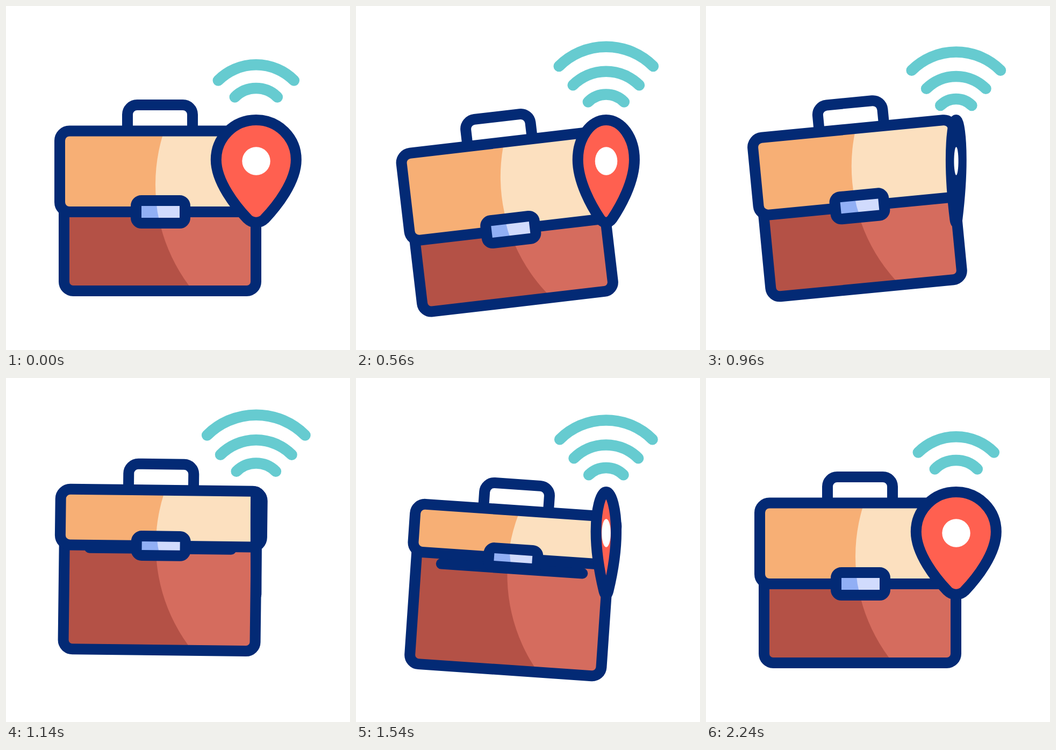
An HTML page that plays this animation: 640 px wide and 640 px high, repeating every 2400 ms.

```html
<!DOCTYPE html>
<html lang="en">
<head>
<meta charset="utf-8">
<title>Briefcase with location pin</title>
<style>
  html, body { margin: 0; width: 100%; height: 100%; overflow: hidden; background: #fff; }
  svg { display: block; width: 100vw; height: 100vh; }
  .line { fill: none; stroke: #032a75; stroke-width: 20; stroke-linecap: round; stroke-linejoin: round; }
  .wave { fill: none; stroke: #66cbd0; stroke-width: 20.5; stroke-linecap: round; }
</style>
</head>
<body>
<svg viewBox="0 0 640 640">
  <defs>
    <clipPath id="bodyClip"><rect x="108" y="262" width="357" height="268" rx="17"/></clipPath>
    <clipPath id="flapClip"><rect class="flap" x="100" y="232.5" width="375" rx="18"/></clipPath>
    <clipPath id="aboveTip"><rect width="640" height="207"/></clipPath>
  </defs>

  <g id="bag">
    <path class="line" d="M226 233V202a18 18 0 0 1 18-18H329a18 18 0 0 1 18 18V233"/>
    <g clip-path="url(#bodyClip)">
      <rect x="100" y="250" width="380" height="290" fill="#b45146"/>
      <circle cx="593" cy="332" r="315" fill="#d56c5e"/>
    </g>
    <rect class="line" x="108" y="262" width="357" height="268" rx="17"/>
    <path class="line" d="M155 341H418"/>
    <g clip-path="url(#flapClip)">
      <rect x="90" y="222" width="400" height="200" fill="#f7af75"/>
      <circle cx="593" cy="332" r="315" fill="#fce0bf"/>
    </g>
    <rect class="line flap" x="100" y="232.5" width="375" rx="18"/>
    <g id="lock">
      <rect class="lockBox" x="242" width="91" rx="10" fill="#d1dbfd"/>
      <path d="M245-12H280.3Q281.3 0 284.3 12H245Z" fill="#91aff5"/>
      <rect class="line lockBox" x="242" width="91" rx="10"/>
    </g>
  </g>

  <g clip-path="url(#aboveTip)">
    <path class="wave"/><path class="wave"/><path class="wave"/>
  </g>

  <path id="pin" class="line" style="fill:#ff6050"/>
  <ellipse id="hole" cx="465.5" cy="288.5" ry="26.2" fill="#fff"/>
</svg>
<script>
const LOOP = 2400, START = 200, WAVE_TIME = 505, PIN_X = 465.3;
const $ = s => document.querySelector(s), $$ = s => [...document.querySelectorAll(s)];
const bag = $('#bag'), lock = $('#lock'), pin = $('#pin'), hole = $('#hole');
const flaps = $$('.flap'), lockBoxes = $$('.lockBox'), waves = $$('.wave');

// [time, value] keys
const tilt = [[205, 0], [745, -9], [1440, 6.9], [1735, -4.5], [2240, 0]];
const lift = [[200, 0], [700, 25], [1160, -24], [1710, 23.8], [2240, 0]];
const stretch = [[205, 0], [745, 17], [1440, -87.7], [1735, 13.3], [2240, 0]];
const turn = [[200, 1], [1190, 0], [2240, 1]];

// start and end [radius, centre y] of each ring
const rings = [[[99.7, 209], [133.6, 195.8]], [[55.9, 209], [99.7, 209]], [[26, 219.3], [55.9, 209]]];

const mix = (a, b, p) => a + (b - a) * p;

function at(keys, t) {
  if (t <= keys[0][0]) return keys[0][1];
  for (let i = 1; i < keys.length; i++) {
    const [t0, a] = keys[i - 1], [t1, b] = keys[i];
    if (t < t1) return mix(a, b, (1 - Math.cos(Math.PI * (t - t0) / (t1 - t0))) / 2);
  }
  return keys[keys.length - 1][1];
}

function pinPath(w) {
  const pt = (x, y) => `${(PIN_X + x * w).toFixed(2)} ${y}`;
  return `M${pt(0, 212)}C${pt(41, 212)} ${pt(74.5, 245)} ${pt(74.5, 286)}` +
    `C${pt(74.5, 327)} ${pt(38, 373)} ${pt(16, 396)}C${pt(7, 405)} ${pt(-7, 405)} ${pt(-16, 396)}` +
    `C${pt(-38, 373)} ${pt(-74.5, 327)} ${pt(-74.5, 286)}C${pt(-74.5, 245)} ${pt(-41, 212)} ${pt(0, 212)}Z`;
}

function drawWaves(t) {
  const run = (t - START) / WAVE_TIME;
  const active = run > 0 && run < 4;
  const p = active ? run % 1 : 0;
  waves.forEach((wave, i) => {
    const [from, to] = rings[i];
    const r = mix(from[0], to[0], p), cy = mix(from[1], to[1], p), d = r * Math.SQRT1_2;
    wave.setAttribute('d', `M${PIN_X - d} ${cy - d}A${r} ${r} 0 0 1 ${PIN_X + d} ${cy - d}`);
  });
  waves[2].style.display = active ? '' : 'none';
}

function draw(t) {
  bag.setAttribute('transform', `translate(0 ${at(lift, t)}) rotate(${at(tilt, t)} 287 393)`);

  const s = at(stretch, t);
  flaps.forEach(f => f.setAttribute('height', 150.5 + s));
  lock.setAttribute('transform', `translate(0 ${383 + s})`);
  const h = 42 + 0.13 * Math.min(0, s);
  lockBoxes.forEach(b => { b.setAttribute('y', -h / 2); b.setAttribute('height', h); });

  const w = at(turn, t);
  pin.setAttribute('d', pinPath(w));
  hole.setAttribute('rx', Math.max(0, 26.2 * w * (1 + 0.45 * (1 - w)) - 0.6 * (1 - w)));

  drawWaves(t);
}

const begin = performance.now();
function tick() {
  draw((performance.now() - begin) % LOOP);
  requestAnimationFrame(tick);
}
tick();
</script>
</body>
</html>
```
